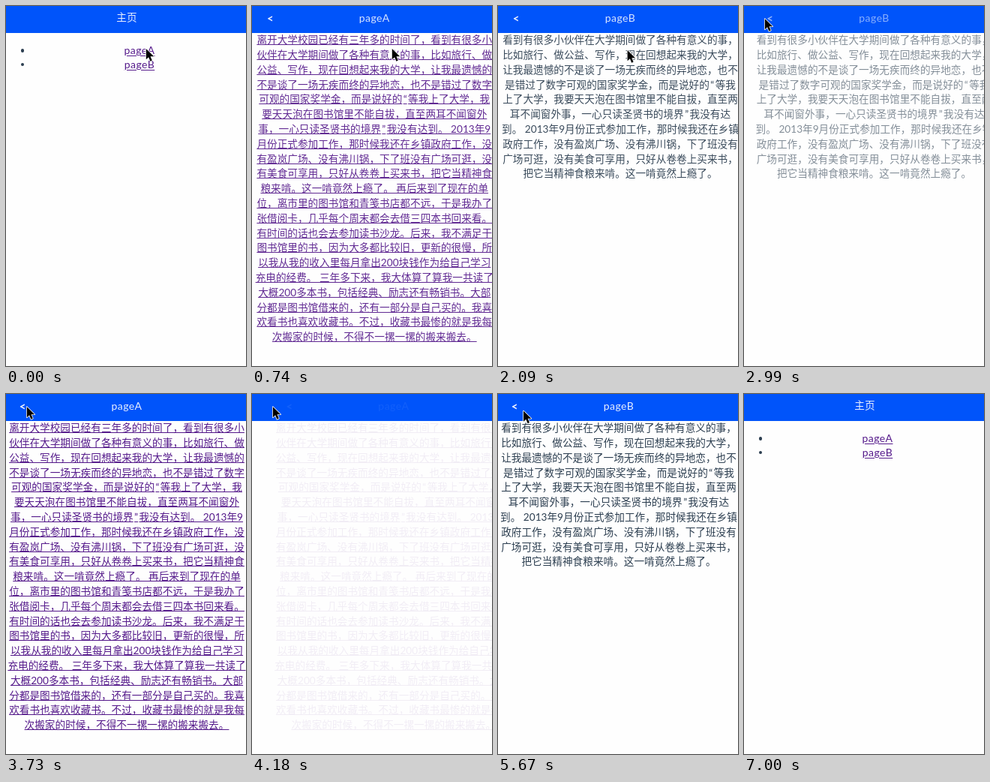
Recreate the animation shown at these times as an HTML page. Size 320x480 px, loop 7.54 s.

```html
<!DOCTYPE html>
<html lang="zh">
<head>
<meta charset="utf-8">
<title>主页</title>
<style>
  html, body { margin: 0; width: 100%; height: 100%; overflow: hidden; background: #fefefe; }
  body { position: relative; color: #2c3e50; font: 13.65px/19.8px Lato, "Noto Sans CJK SC", "Noto Sans CJK", sans-serif; }
  .bar { position: absolute; left: 0; top: 0; width: 100%; height: 36px; background: #0054fa; }
  .page { position: absolute; left: 1px; top: 0; width: 320px; height: 480px; opacity: 0; }
  .page > * { position: absolute; white-space: pre; }
  .title { left: 0; top: 6.4px; width: 100%; color: #eaf1ff; text-align: center; }
  .back { left: 16.7px; top: 7.4px; color: #fff; font-size: 15px; font-weight: 700; }
  .latin { font-size: 14px; letter-spacing: .45px; }
  .text { left: -20px; width: 360px; top: 36.2px; text-align: center; }
  .text i { font-style: normal; margin: 0 1.4px; }
  .link { color: #551a8b; text-decoration: underline 1px; text-underline-offset: 2px; }
  .text .link { text-underline-offset: 1px; }
  .link.on { color: #f00; }
  .item { left: 34px; width: 286px; text-align: center; }
  .dot { left: 18.6px; width: 4.4px; height: 4.4px; border-radius: 50%; background: #2c3e50; }
  .cursor { position: absolute; left: 0; top: 0; width: 16px; height: 22px; overflow: visible; }
</style>
</head>
<body>
<div class="bar"></div>
<div class="page" id="home">
  <div class="title">主页</div>
  <div class="dot" style="top:57.2px"></div>
  <div class="item latin" style="top:48.8px"><span class="link" id="linkA">pageA</span></div>
  <div class="dot" style="top:76px"></div>
  <div class="item latin" style="top:67.6px"><span class="link" id="linkB">pageB</span></div>
</div>
<div class="page" id="pageA">
  <div class="back">&lt;</div>
  <div class="title latin">pageA</div>
  <div class="text"><span class="link" id="story"></span></div>
</div>
<div class="page" id="pageB">
  <div class="back">&lt;</div>
  <div class="title latin">pageB</div>
  <div class="text" id="note"></div>
</div>
<svg class="cursor" id="cursor">
  <path d="M0 0V14.2L3.3 11.2L5.6 16.7L8 15.6L5.7 10.3H10.4Z" fill="#000" stroke="#fff" stroke-width="1.6" stroke-linejoin="round" paint-order="stroke"/>
</svg>
<script>
const $ = id => document.getElementById(id);

const storyLines = `离开大学校园已经有三年多的时间了，看到有很多小
伙伴在大学期间做了各种有意义的事，比如旅行、做
公益、写作，现在回想起来我的大学，让我最遗憾的
不是谈了一场无疾而终的异地恋，也不是错过了数字
可观的国家奖学金，而是说好的“等我上了大学，我
要天天泡在图书馆里不能自拔，直至两耳不闻窗外
事，一心只读圣贤书的境界”我没有达到。 2013年9
月份正式参加工作，那时候我还在乡镇政府工作，没
有盈岚广场、没有沸川锅，下了班没有广场可逛，没
有美食可享用，只好从卷卷上买来书，把它当精神食
粮来啃。这一啃竟然上瘾了。 再后来到了现在的单
位，离市里的图书馆和青笺书店都不远，于是我办了
张借阅卡，几乎每个周末都会去借三四本书回来看。
有时间的话也会去参加读书沙龙。后来，我不满足于
图书馆里的书，因为大多都比较旧，更新的很慢，所
以我从我的收入里每月拿出200块钱作为给自己学习
充电的经费。 三年多下来，我大体算了算我一共读了
大概200多本书，包括经典、励志还有畅销书。大部
分都是图书馆借来的，还有一部分是自己买的。我喜
欢看书也喜欢收藏书。不过，收藏书最惨的就是我每
次搬家的时候，不得不一摞一摞的搬来搬去。`;

const noteLines = `看到有很多小伙伴在大学期间做了各种有意义的事，
比如旅行、做公益、写作，现在回想起来我的大学，
让我最遗憾的不是谈了一场无疾而终的异地恋，也不
是错过了数字可观的国家奖学金，而是说好的“等我
上了大学，我要天天泡在图书馆里不能自拔，直至两
耳不闻窗外事，一心只读圣贤书的境界”我没有达
到。 2013年9月份正式参加工作，那时候我还在乡镇
政府工作，没有盈岚广场、没有沸川锅，下了班没有
广场可逛，没有美食可享用，只好从卷卷上买来书，
把它当精神食粮来啃。这一啃竟然上瘾了。`;

const spaceQuotes = s => s.replace(/[“”]/g, '<i>$&</i>');
$('story').innerHTML = spaceQuotes(storyLines);
$('note').innerHTML = spaceQuotes(noteLines);

const LOOP = 7540, STEP = 149, LEAD = 10;
const FADE = 400, SHIFT = 30, PRESS = 140, GLIDE = 480;

// Each page slides out before the next slides in.
const routes = [
  { at: 85, to: 'pageA', dir: 1, tap: 'linkA' },
  { at: 1420, to: 'pageB', dir: 1, tap: 'story' },
  { at: 2841, to: 'pageA', dir: -1 },
  { at: 3910, to: 'home', dir: -1 },
  { at: 4864, to: 'pageB', dir: 1, tap: 'linkB' },
  { at: 6150, to: 'home', dir: -1 }
];

const moves = [
  { at: 840, x: 172.6, y: 59 },
  { at: 2140, x: 27.8, y: 17 },
  { at: 4250, x: 182, y: 79.5 },
  { at: 5120, x: 34, y: 22.5 },
  { at: 5680, x: 27, y: 16 },
  { at: 6200, x: 150, y: 500 }
];

const clamp = v => Math.min(1, Math.max(0, v));
const easeOut = u => 1 - (1 - u) ** 3;

// cubic-bezier(.55, 0, .1, 1)
function ease(x) {
  let lo = 0, hi = 1, s;
  for (let i = 0; i < 24; i++) {
    s = (lo + hi) / 2;
    const v = 1.65 * s * (1 - s) ** 2 + .3 * s * s * (1 - s) + s ** 3;
    if (v < x) lo = s; else hi = s;
  }
  return s * s * (3 - 2 * s);
}

function viewAt(t) {
  const i = routes.findLastIndex(r => r.at <= t);
  if (i < 0) return { id: 'home', x: 0, alpha: 1 };
  const { at, to, dir, tap } = routes[i];
  const age = t - at;
  const leaving = age < FADE;
  const p = ease(clamp(leaving ? age / FADE : age / FADE - 1));
  const alpha = leaving ? 1 - p : p;
  return {
    id: leaving ? (i ? routes[i - 1].to : 'home') : to,
    x: (leaving ? -dir : dir) * SHIFT * (1 - alpha),
    alpha,
    tapped: age < PRESS ? tap : null
  };
}

function cursorAt(t) {
  let x = 186.8, y = 57;
  for (const m of moves) {
    const k = easeOut(clamp((t - m.at) / GLIDE));
    x += (m.x - x) * k;
    y += (m.y - y) * k;
  }
  return [x, y];
}

function render(t) {
  const view = viewAt(t);
  for (const id of ['home', 'pageA', 'pageB']) {
    const shown = id === view.id, style = $(id).style;
    style.opacity = shown ? view.alpha : 0;
    style.transform = shown ? `translateX(${view.x.toFixed(2)}px)` : 'none';
  }
  for (const id of ['linkA', 'linkB', 'story']) $(id).classList.toggle('on', id === view.tapped);
  const [x, y] = cursorAt(t);
  $('cursor').style.transform = `translate(${x}px, ${y}px)`;
}

// The picture is refreshed about seven times a second.
const begin = performance.now();
function loop() {
  const t = (performance.now() - begin) % LOOP;
  render(Math.floor((t + LEAD) / STEP) * STEP);
  requestAnimationFrame(loop);
}
loop();
</script>
</body>
</html>
```
